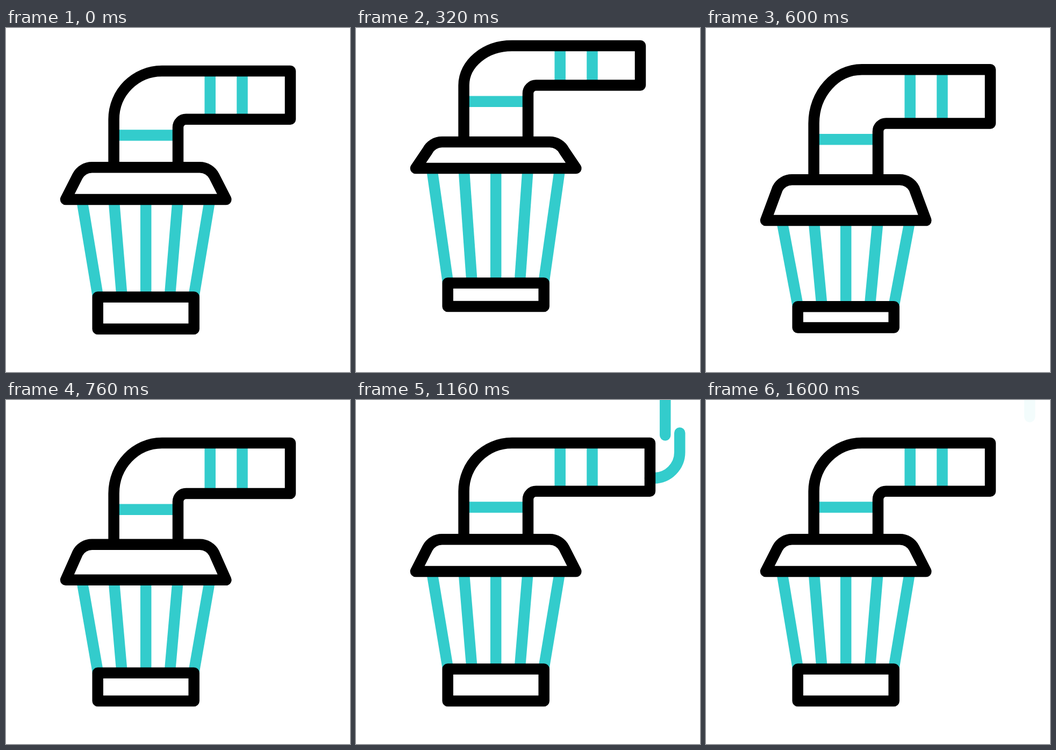
These frames come from a looping animation (640x640 px, 2000 ms). An HTML page with a canvas:

```html
<!DOCTYPE html>
<html lang="en">
<head>
<meta charset="utf-8">
<title>Air filter</title>
<style>
html, body { margin: 0; width: 100%; height: 100%; overflow: hidden; background: #fff; }
canvas { display: block; width: 100vw; height: 100vh; }
</style>
</head>
<body>
<canvas id="stage" width="640" height="640"></canvas>
<script>
const ctx = document.getElementById('stage').getContext('2d');
const LOOP = 2000, STEP = 40, LAST_STEP = 1600;
const BLACK = '#000', TEAL = '#33cccc';
const MIDDLE = 260.2;

// Heights: tube top, tube bottom, band, cap top, cap bottom, base top, base bottom
const REST = [80, 169.8, 199.5, 259.2, 319, 500.4, 560];
const LEAP = [-49.7, -67, -66.3, -50, -61.3, -27.5, -44.4];
const SQUASH = [0, 12, 12, 27.3, 45, 20.6, 0];

function ease(t, from, to) {
  const u = Math.min(1, Math.max(0, (t - from) / (to - from)));
  return u * u * (3 - 2 * u);
}

function pose(t) {
  const fall = ease(t, 360, 640);
  const leap = ease(t, 80, 360) - fall;
  const squash = fall - ease(t, 640, 840);
  return REST.map((y, i) => y + LEAP[i] * leap + SQUASH[i] * squash);
}

function stroke(color, trace) {
  ctx.strokeStyle = color;
  ctx.beginPath();
  trace();
  ctx.stroke();
}

function line(x1, y1, x2, y2) {
  stroke(TEAL, () => {
    ctx.moveTo(x1, y1);
    ctx.lineTo(x2, y2);
  });
}

// A plume leaves the tube, bends upwards and is visible between tail and head.
function plume(startX, radius, head, tail) {
  const cx = 554, cy = 97, top = -40;
  const length = cx - startX + radius * Math.PI / 2 + cy - top;
  if (head - tail < 0.001) return;
  ctx.setLineDash([(head - tail) * length, 2000]);
  ctx.lineDashOffset = -tail * length;
  stroke(TEAL, () => {
    ctx.moveTo(startX, cy + radius);
    ctx.lineTo(cx, cy + radius);
    ctx.arc(cx, cy, radius, Math.PI / 2, 0, true);
    ctx.lineTo(cx + radius, top);
  });
}

function drawSmoke(t, startX) {
  ctx.save();
  ctx.lineCap = 'round';
  ctx.globalAlpha = 1 - ease(t, 1360, 1640);
  plume(startX, 21.3, ease(t, 840, 1120), ease(t, 980, 1393));
  plume(startX, 48.3, ease(t, 1000, 1304), ease(t, 1320, 1760));
  ctx.restore();
}

function drawTube(top, bottom, band, capTop, endX) {
  const left = 200.6, right = 320, bendX = 290, k = 0.552;
  line(left, band, right, band);
  line(379.7, top, 379.7, bottom);
  line(439.5, top, 439.5, bottom);
  stroke(BLACK, () => {
    ctx.moveTo(left, capTop);
    ctx.lineTo(left, bottom);
    ctx.bezierCurveTo(left, bottom - k * (bottom - top),
      bendX - k * (bendX - left), top, bendX, top);
    ctx.lineTo(endX, top);
    ctx.lineTo(endX, bottom);
    ctx.lineTo(right + 15, bottom);
    ctx.bezierCurveTo(right + 6.7, bottom, right, bottom + 6.7, right, bottom + 15);
    ctx.lineTo(right, capTop);
  });
}

function drawCap(top, bottom) {
  const mirror = x => 2 * MIDDLE - x;
  stroke(BLACK, () => {
    ctx.moveTo(111, bottom);
    ctx.lineTo(133, top + 16.5);
    ctx.bezierCurveTo(138, top + 6.4, 148.5, top, 160, top);
    ctx.lineTo(mirror(160), top);
    ctx.bezierCurveTo(mirror(148.5), top, mirror(138), top + 6.4, mirror(133), top + 16.5);
    ctx.lineTo(mirror(111), bottom);
    ctx.closePath();
  });
}

function draw(t) {
  const [tubeTop, tubeBottom, band, capTop, capBottom, baseTop, baseBottom] = pose(t);
  const endX = 529 + 19 * (ease(t, 840, 1120) - ease(t, 1120, 1400));
  ctx.fillStyle = '#fff';
  ctx.fillRect(0, 0, 640, 640);
  ctx.lineWidth = 20.5;
  ctx.lineJoin = 'round';

  drawSmoke(t, endX);
  for (let i = -2; i <= 2; i++) {
    line(MIDDLE + i * 59.6, capBottom, MIDDLE + i * 44.5, baseTop);
  }
  drawTube(tubeTop, tubeBottom, band, capTop, endX);
  drawCap(capTop, capBottom);
  stroke(BLACK, () => ctx.rect(170.7, baseTop, 179, baseBottom - baseTop));
}

const start = performance.now();
function tick() {
  const t = (performance.now() - start) % LOOP;
  draw(Math.min(LAST_STEP, Math.floor(t / STEP) * STEP));
  requestAnimationFrame(tick);
}
tick();
</script>
</body>
</html>
```
